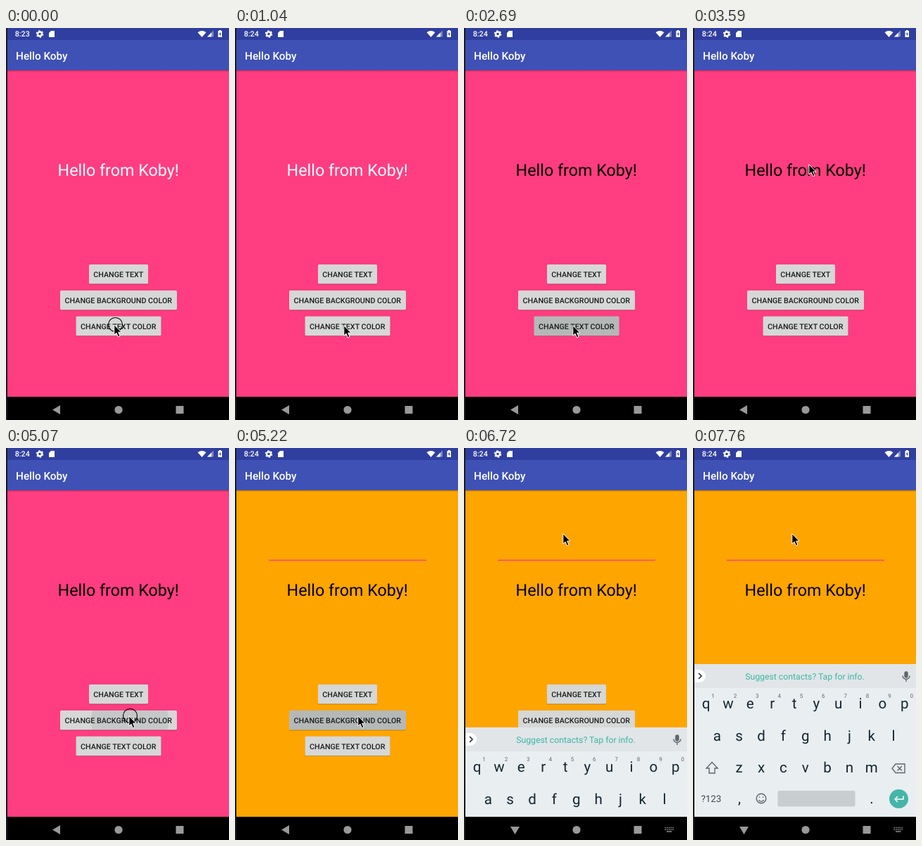
An HTML page for the animation above (8000 ms loop, 317 by 557 pixels).

```html
<!DOCTYPE html>
<html lang="en">
<head>
<meta charset="utf-8">
<title>Hello Koby</title>
<style>
html, body { margin: 0; width: 100%; height: 100%; overflow: hidden; background: #000; }
svg { display: block; width: 317px; height: 557px; font-family: Roboto, sans-serif; text-rendering: geometricPrecision; }
.medium { font-weight: 500; }
.mid { text-anchor: middle; }
</style>
</head>
<body>
<svg viewBox="0 0 317 557">
  <defs>
    <linearGradient id="shade" x2="0" y2="1">
      <stop stop-opacity=".3"/><stop offset="1" stop-opacity="0"/>
    </linearGradient>
  </defs>
  <rect id="page" y="60" width="317" height="464"/>
  <rect y="60" width="317" height="2.5" fill="url(#shade)"/>
  <path d="M48 159.5H272" stroke="#ff4081" stroke-width="1.5"/>
  <rect id="caret" x="47" y="117" width="2" height="19" fill="#ff4081"/>
  <text id="hello" class="mid" x="159.7" y="210" font-size="23.3">Hello from Koby!</text>
  <g id="buttons"></g>

  <g id="keyboard">
    <rect y="307" width="317" height="217" fill="#e9eef1"/>
    <rect y="307" width="317" height="34" fill="#e1e5e8"/>
    <path d="M2 315H9a9 9 0 0 1 0 18H2Z" fill="#fff"/>
    <path d="M8 320l4 4-4 4" fill="none" stroke="#222" stroke-width="1.5"/>
    <text class="mid" x="159" y="329" font-size="12.25" fill="#3cb5a5">Suggest contacts? Tap for info.</text>
    <g fill="none" stroke="#5b676c" stroke-width="1.4">
      <rect x="301" y="318" width="4" height="8" rx="2" fill="#5b676c"/>
      <path d="M298 323.500a5 5 0 0 0 10 0M303 328.500V332"/>
      <path d="M27 446.500L19 455h4v7h8v-7h4Z"/>
      <path d="M288 449H301V461.500H288L283 455.200ZM290.500 452l6.500 6.500m0-6.500l-6.500 6.500"/>
      <circle cx="97" cy="498" r="6.800"/>
      <path d="M93.500 500a3.800 3.800 0 0 0 7 0M94.500 495.200v1.600M99.500 495.200v1.600"/>
    </g>
    <g id="keys" class="mid" fill="#14262e" font-size="20.500"></g>
    <text x="11.500" y="503" font-size="13.300" fill="#3c4a50">?123</text>
    <rect x="120.500" y="487" width="110" height="22.500" rx="2" fill="#c8cdd0"/>
    <circle cx="292.500" cy="498.500" r="13.500" fill="#45b5aa"/>
    <path d="M299 494.500v4.500H287m4-4l-4 4 4 4" fill="none" stroke="#fff" stroke-width="1.500"/>
  </g>

  <rect y="17" width="317" height="43" fill="#3f51b5"/>
  <rect width="317" height="17" fill="#303f9f"/>
  <text class="medium" x="14" y="45" font-size="15.300" fill="#fff">Hello Koby</text>
  <g fill="#fff">
    <text id="clock" class="medium" x="12.700" y="12" font-size="10.700"></text>
    <circle cx="48" cy="8.500" r="3" fill="none" stroke="#fff" stroke-width="2.400"/>
    <circle cx="48" cy="8.500" r="4.600" fill="none" stroke="#fff" stroke-width="1.400" stroke-dasharray="2.400 2.417"/>
    <path d="M64 4H69V13H61V7Z"/>
    <path d="M272.500 6.200Q278.500 1.800 284.500 6.200L278.500 13Z"/>
    <path d="M295 3.500V12.500H286Z" opacity=".4"/>
    <path d="M292 6.500V12.500H286Z"/>
    <path d="M302.500 4H303V3H305.500V4H307V13H301.500V4Z"/>
  </g>
  <path d="M304.800 5.500L302.800 9H304V11.500L306 8H304.800Z" fill="#303f9f"/>

  <rect y="524" width="317" height="33"/>
  <g fill="#999">
    <path id="back"/>
    <circle cx="160" cy="542.500" r="5.600"/>
    <rect x="241.500" y="537" width="11" height="11" rx=".5"/>
  </g>
  <g id="switcher" fill="none" stroke="#999" stroke-width="1.400">
    <path d="M285.500 539.500H298M285.500 542.300H298" stroke-dasharray="1.500 1.200"/>
    <path d="M288 545H295.500"/>
  </g>
  <rect width="2" height="557" fill="#1b1b1f"/>

  <g id="pointer">
    <circle id="ring" cx="2.500" cy=".5" r="10" fill="none" stroke="#000" stroke-width="1.100"/>
    <path d="M.8 .8V15.200L4 12.200L6.400 17.800L9 16.700L6.600 11.200H11Z" stroke="#fff" stroke-width="1"/>
  </g>
</svg>
<script>
const LOOP = 8000, STEP = 149.4, LEAD = 12;
const $ = id => document.getElementById(id);
const show = (id, on) => $(id).setAttribute('visibility', on ? 'visible' : 'hidden');

// label, left, top, width, ripple centre
const buttons = [
  ['CHANGE TEXT', 118, 336, 84, 160],
  ['CHANGE BACKGROUND COLOR', 77, 373, 166, 176],
  ['CHANGE TEXT COLOR', 99.5, 409.7, 121, 156]
];
$('buttons').innerHTML = buttons.map(([label, x, y, w, cx], i) => `
  <clipPath id="clip${i}"><rect x="${x}" y="${y}" width="${w}" height="27.5" rx="1.5"/></clipPath>
  <rect x="${x}" y="${y + .9}" width="${w}" height="27.5" rx="1.5" opacity=".25"/>
  <rect x="${x}" y="${y}" width="${w}" height="27.5" rx="1.5" fill="#d6d7d7"/>
  <circle id="ripple${i}" cx="${cx}" cy="${y + 14}" clip-path="url(#clip${i})" fill="#5c6d68"/>
  <text class="mid medium" x="159.8" y="${y + 17.9}" font-size="10.72" fill="#1c1c1c">${label}</text>`).join('');

const key = (c, x, y, more = '') => `<text x="${x}" y="${y}" ${more}>${c}</text>`;
const row = (chars, x, y) => [...chars].map((c, i) => key(c, x + i * 31.35, y)).join('');
$('keys').innerHTML = row('qwertyuiop', 18.6, 370) + row('asdfghjkl', 34.3, 415.5) +
  row('zxcvbnm', 65.7, 461) + key(',', 66, 505) + key('.', 254, 505) +
  [...'1234567890'].map((c, i) => key(c, 28.6 + i * 31.35, 355, 'font-size="8" fill="#5b676c"')).join('');

// pointer path: step, x, y
const path = [
  [0, 153, 421], [6, 153, 421], [7, 154, 422], [18, 154, 422], [19, 155, 417], [20, 159, 382],
  [22, 167, 215], [23, 166, 185], [24, 164, 193], [25, 164, 193], [28, 154, 148],
  [31, 183, 300], [33, 174, 380], [37, 174, 380], [39, 153, 220], [41, 140, 121], [54, 140, 121]
];
function pointerAt(s) {
  const i = path.findIndex(p => p[0] > s);
  if (i < 0) return path[path.length - 1].slice(1);
  const [a, x, y] = path[i - 1], [b, u, v] = path[i], k = (s - a) / (b - a);
  return [x + (u - x) * k, y + (v - y) * k];
}

const presses = [0, 3, 4, 10, 14, 17, 34, 42];
// ripple age: spreading, full, fading
const ripples = [[55, .14], [100, .28], [100, .1]];
function ripple(i, age) {
  const [r, alpha] = ripples[age] || [0, 0];
  $('ripple' + i).setAttribute('r', r);
  $('ripple' + i).setAttribute('opacity', alpha);
}

function draw(s) {
  const black = s >= 11 && s < 15 || s >= 18;
  const lift = s < 45 ? 217 : s < 46 ? 90 : 0;
  const typing = s >= 44;
  $('page').setAttribute('fill', s < 35 ? '#ff3d80' : '#ffa500');
  $('hello').setAttribute('fill', black ? '#000' : '#fff');
  $('clock').textContent = s < 4 ? '8:23' : '8:24';
  ripple(1, s - 34);
  ripple(2, s < 12 ? s - 10 : s < 17 ? s - 14 : s - 17);
  show('caret', s >= 49 && s < 52);
  show('ring', presses.includes(s));
  show('keyboard', s >= 45);
  show('switcher', typing);
  $('keyboard').setAttribute('transform', `translate(0 ${lift})`);
  $('back').setAttribute('d', typing ? 'M66 538H79L72.500 549Z' : 'M77 536V549L66 542.500Z');
  $('pointer').setAttribute('transform', `translate(${pointerAt(s)})`);
}

let start;
function tick(now) {
  start ??= now;
  draw(Math.floor(((now - start) % LOOP + LEAD) / STEP));
  requestAnimationFrame(tick);
}
draw(0);
requestAnimationFrame(tick);
</script>
</body>
</html>
```
